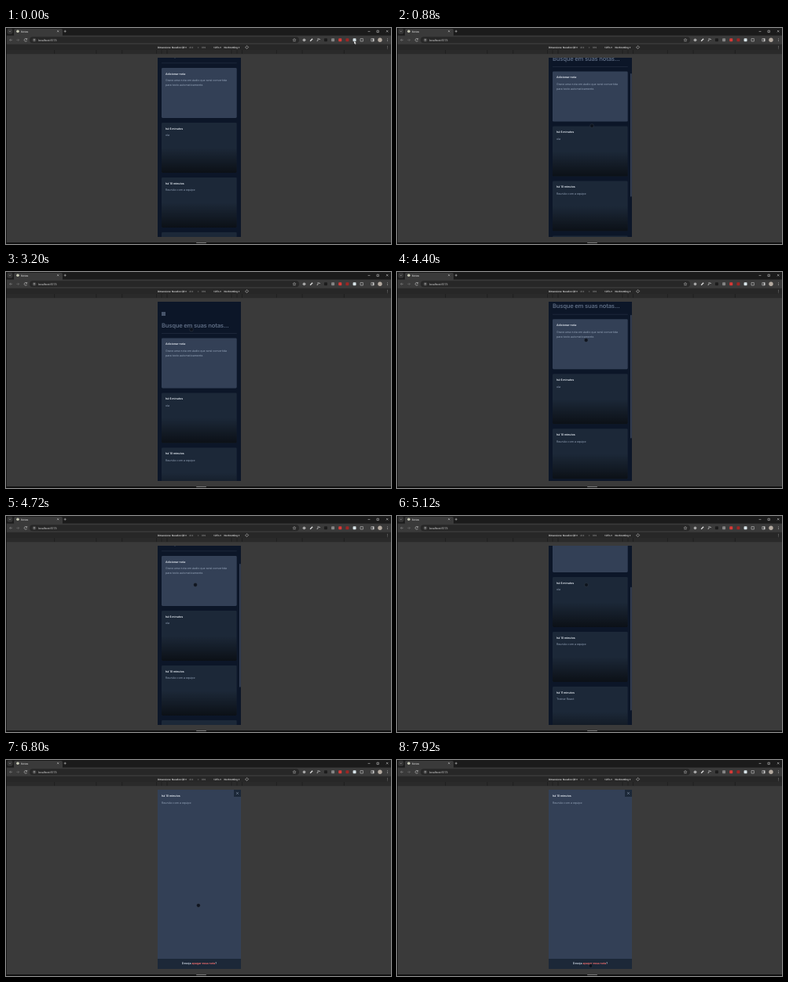
An HTML page for the animation above (8000 ms loop, 490 by 276 pixels).

```html
<!DOCTYPE html>
<html lang="pt">
<head>
<meta charset="utf-8">
<title>Notes</title>
<style>
html, body { margin: 0; width: 100%; height: 100%; overflow: hidden; background: #3a3a3a; }
svg { display: block; width: 100vw; height: 100vh; }
text { font-family: Inter, Roboto, sans-serif; text-rendering: geometricPrecision; white-space: pre; }
.ui text { font-family: Roboto, Arial, sans-serif; }
</style>
</head>
<body>
<svg id="stage" viewBox="0 0 490 276" preserveAspectRatio="none"></svg>
<script>
const LOOP = 8000;
const PHONE = { x: 193, y: 38, w: 106, h: 229 };
const MAX_SCROLL = 103.4;
const VISIBLE = PHONE.h / (PHONE.h + MAX_SCROLL);
const CARD = { x: 198, y: 84.4, w: 95.7, h: 64, pitch: 70 };
const SLATE = { bg: '#0c1628', dark: '#1c2838', mid: '#334056', muted: '#94a3b8', light: '#e2e8f0' };
const ICON = '#c7c7c7';

const rect = (x, y, w, h, fill, r = 0, extra = '') =>
  `<rect x="${x}" y="${y}" width="${w}" height="${h}" rx="${r}" fill="${fill}" ${extra}/>`;
const dot = (x, y, r, fill, extra = '') =>
  `<circle cx="${x}" cy="${y}" r="${r}" fill="${fill}" ${extra}/>`;
const text = (x, y, size, fill, str, weight = 400, extra = '') =>
  `<text x="${x}" y="${y}" font-size="${size}" fill="${fill}" font-weight="${weight}" ${extra}>${str}</text>`;
const icon = (x, y, d, color = ICON, w = 0.6) =>
  `<path transform="translate(${x} ${y})" d="${d}" fill="none" stroke="${color}" stroke-width="${w}"/>`;
const cross = (x, y, r, color) => icon(x, y, `M${-r} ${-r}L${r} ${r}M${r} ${-r}L${-r} ${r}`, color);
const box = (x, y, color) => icon(x, y, 'M-1.7-1.7h3.4v3.4h-3.4z', color);
const menuDots = y => [-1.5, 0, 1.5].map(d => dot(485.5, y + d, 0.45, ICON)).join('');

function tabStrip() {
  return rect(0, 0, 490, 10, '#1b1b1b') +
    rect(10, 1, 62, 10, '#3a3a3a', 2) +
    rect(1.5, 0.8, 7, 7, '#343434', 2) + icon(5, 4.2, 'M-1-.5l1 1l1-1') +
    dot(15, 4.2, 1.8, '#c9cbb8') + text(19, 5.5, 3.5, '#dedede', 'Notes') +
    cross(66.2, 4.2, 1) + icon(75.2, 4.2, 'M-1.5 0h3M0-1.5v3') +
    icon(462, 4.4, 'M-1.4 0h2.8') + icon(473.2, 4.4, 'M-1.2-1.2h2.4v2.4h-2.4z') + cross(485.2, 4.2, 1.2);
}

function extensions() {
  const pen = x => icon(x, 15.3, 'M-1.5 1.5l3-3', '#e0e0e0', 1.3);
  const pin = x => icon(x, 15.3, 'M-1.5-1.3h2.5l1 1m-2.5 0l-1.5 2', '#d5d5d5', 0.8);
  const tile = color => x => rect(x - 2, 13.3, 4, 4, color, 0.8);
  const row = [x => dot(x, 15.3, 1.9, '#a5a5a5'), pen, pin, tile('#1c1c1c'), tile('#858585'),
    tile('#d83a37'), tile('#9c2624'), tile('#d8e4e8'), x => box(x, 15.3)];
  return row.map((draw, i) => draw(379.5 + i * 9.15)).join('');
}

function toolbar() {
  const arrow = 'M1.7 0h-3.4m1.5-1.5l-1.5 1.5l1.5 1.5';
  return rect(0, 9.6, 490, 11.4, '#3a3a3a') +
    rect(30, 11.2, 343, 8, '#272727', 4) +
    icon(6.3, 15.3, arrow, '#8a8a8a') + `<g transform="rotate(180 15 15.3)">${icon(15, 15.3, arrow, '#707070')}</g>` +
    icon(25, 15.3, 'M1.3-1.3a1.8 1.8 0 1 0 .4 2M1.7-2.3v1.5h-1.5') +
    dot(36, 15.3, 2.5, '#3c3c3c') + icon(36, 15.3, 'M-1.2-.7h2.4M-1.2.7h2.4') +
    text(41, 16.6, 3.6, '#dedede', 'localhost:5173') +
    icon(367, 15.3, 'M0-2l.6 1.3l1.4.2l-1 1l.2 1.4l-1.2-.7l-1.2.7l.2-1.4l-1-1l1.4-.2z', ICON, 0.45) +
    extensions() + box(466.5, 15.3) + rect(466.7, 13.6, 1.5, 3.4, ICON) +
    dot(476, 15.2, 2.7, '#b4aaa0') + menuDots(15.3);
}

function devtools() {
  const label = (x, str, fill = '#e4e4e4') => text(x, 25.6, 3.1, fill, str, 500);
  const breakpoints = [320, 375, 425, 768, 1024, 1440];
  const ticks = breakpoints.flatMap(w => [246 - w * 0.128, 246 + w * 0.128]);
  return rect(0, 20.8, 490, 12.4, '#272727') +
    label(193, 'Dimensions: Novafon QR ▾') +
    label(233, '414', '#858585') + label(243.7, '×', '#858585') + label(249, '896', '#858585') +
    label(264, '125% ▾') + label(277.5, 'No throttling ▾') +
    icon(306.5, 24.7, 'M-2 0l2.4-2l1.8 1.8l-2.4 2z') + menuDots(24.6) +
    rect(0, 28, 490, 5, '#2a2a2a') +
    ticks.map(x => rect(x - 0.4, 28, 0.8, 5, '#1e1e1e')).join('') +
    rect(0, 274, 490, 2, '#111') + rect(242, 274, 13, 1, '#777', 0.4) +
    rect(0, 0, 0.8, 276, '#111');
}

function card(row, title, ...lines) {
  const { x, w, h } = CARD, y = CARD.y + row * CARD.pitch;
  return rect(x, y, w, h, row ? SLATE.dark : SLATE.mid, 1.4) +
    (row ? rect(x, y + h / 2, w, h / 2, 'url(#shade)', 1.4) : '') +
    text(x + 5, y + 8.9, 3.58, SLATE.light, title, 600) +
    lines.map((s, i) => text(x + 5, y + 17.4 + i * 6.1, 3.58, SLATE.muted, s)).join('');
}

function page() {
  return rect(198, 51, 5, 5, '#47546a') +
    text(198, 70.6, 7.6, '#5d6b82', 'Busque em suas notas...', 600, 'letter-spacing="-.19"') +
    rect(198, 78.1, CARD.w, 0.4, '#334155') +
    card(0, 'Adicionar nota', 'Grave uma nota em áudio que será convertida', 'para texto automaticamente.') +
    card(1, 'há 6 minutos', 'ola') +
    card(2, 'há 10 minutos', 'Reunião com a equipe') +
    card(3, 'há 11 minutos', 'Treinar React');
}

function modal() {
  return rect(193, 38, 106, 229, SLATE.mid) +
    rect(290, 38, 9, 9, SLATE.dark) + cross(294.5, 42.5, 1.3, SLATE.muted) +
    text(198, 46.7, 3.58, SLATE.light, 'há 10 minutos', 600) +
    text(198, 55.5, 3.58, SLATE.muted, 'Reunião com a equipe') +
    rect(193, 254, 106, 13, SLATE.dark) +
    text(246, 261.4, 3.58, '#cbd5e1',
      'Deseja <tspan fill="#f87171">apagar essa nota</tspan>?', 600, 'text-anchor="middle"');
}

const stage = document.getElementById('stage');
stage.innerHTML = `
  <defs>
    <linearGradient id="shade" x1="0" y1="0" x2="0" y2="1">
      <stop offset="0" stop-color="#000" stop-opacity="0"/>
      <stop offset="1" stop-color="#000" stop-opacity=".6"/>
    </linearGradient>
    <clipPath id="screen">${rect(PHONE.x, PHONE.y, PHONE.w, PHONE.h, '#fff')}</clipPath>
  </defs>
  ${rect(0, 0, 490, 276, '#3a3a3a')}
  <g class="ui">${tabStrip()}${toolbar()}${devtools()}</g>
  <g clip-path="url(#screen)">
    ${rect(PHONE.x, PHONE.y, PHONE.w, PHONE.h, SLATE.bg)}
    <g id="page">${page()}</g>
    ${rect(297, PHONE.y, 1.7, PHONE.h * VISIBLE, '#475266', 0.8, 'id="thumb"')}
    <g id="modal">${modal()}</g>
  </g>
  ${dot(0, 0, 2.4, '#0b111b', 'id="touch" fill-opacity=".9" stroke="#454d59" stroke-width=".35"')}
  <path id="arrow" d="M-1-1v4.1l1-.9l.7 1.6l.8-.4l-.7-1.5h1.3z" fill="#fff" stroke="#111" stroke-width=".3"/>`;

const [pageEl, thumbEl, modalEl, touchEl, arrowEl] =
  ['page', 'thumb', 'modal', 'touch', 'arrow'].map(id => document.getElementById(id));

const NOTCH = 33.4;
const WHEEL_UP = 800;
const WHEEL_DOWN = [4270, 4720, 5050, 5380];
const MODAL_AT = 6360;
const REST = { x: 444, y: 17.5 };
const MOVES = [
  { from: 80, to: 760, x: 248, y: 125 },
  { from: 1840, to: 2960, x: 236, y: 73.5 },
  { from: 3840, to: 4500, x: 241, y: 88 },
  { from: 5560, to: 6160, x: 244, y: 143.5 },
  { from: 6480, to: 7280, x: 246.5, y: 263 },
];

function ease(t, from, to) {
  const p = Math.min(1, Math.max(0, (t - from) / (to - from)));
  return p * p * (3 - 2 * p);
}

function scrollAt(t) {
  const down = WHEEL_DOWN.reduce((sum, w) => sum + ease(t, w, w + 200), 0);
  return Math.min(MAX_SCROLL, NOTCH * (1 - ease(t, WHEEL_UP, WHEEL_UP + 350) + down));
}

// The thumb appears with each wheel turn and fades once it rests.
const thumbAt = t => Math.max(...[WHEEL_UP, ...WHEEL_DOWN].map(w =>
  ease(t, w, w + 40) * (1 - ease(t, w + 700, w + 850))));

const pointerAt = t => MOVES.reduce((p, m) => {
  const k = ease(t, m.from, m.to);
  return { x: p.x + (m.x - p.x) * k, y: p.y + (m.y - p.y) * k };
}, REST);

const show = (el, on) => el.setAttribute('visibility', on ? 'visible' : 'hidden');
const move = (el, x, y) => el.setAttribute('transform', `translate(${x} ${y})`);

function draw(t) {
  const scroll = scrollAt(t);
  const { x, y } = pointerAt(t);
  const inside = x > PHONE.x && x < PHONE.x + PHONE.w && y > PHONE.y;
  move(pageEl, 0, -scroll);
  move(thumbEl, 0, scroll * VISIBLE);
  thumbEl.setAttribute('opacity', thumbAt(t) * 0.75);
  show(modalEl, t >= MODAL_AT);
  show(touchEl, inside);
  show(arrowEl, !inside);
  move(touchEl, x, y);
  move(arrowEl, x, y);
}

const start = performance.now();
function tick() {
  draw((performance.now() - start) % LOOP);
  requestAnimationFrame(tick);
}
tick();
</script>
</body>
</html>
```
